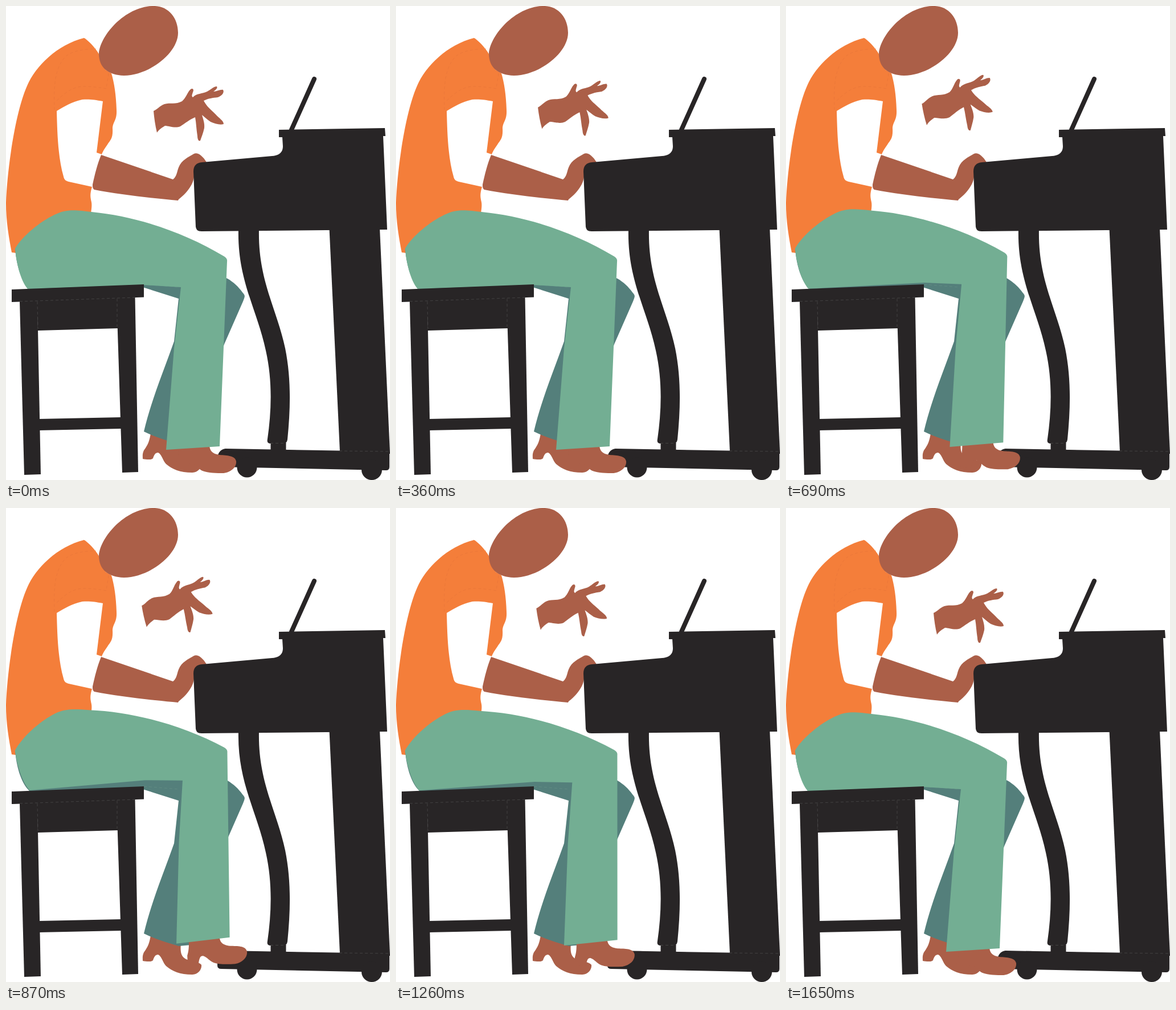
An HTML page that plays this animation: 674x831 px, repeating every 2250 ms.

```html
<!DOCTYPE html>
<html lang="en">
<head>
<meta charset="utf-8">
<title>Pianist</title>
<style>
  html, body { margin: 0; width: 100%; height: 100%; overflow: hidden; background: #fff; }
  svg { display: block; width: 674px; height: 831px; }
  .skin { fill: #ab5f48; }
  .shirt { fill: #f47e3a; }
  .near { fill: #73ae93; }
  .far { fill: #547f7b; }
  .wood { fill: #282526; }
  .seam { fill: none; stroke-width: .6; stroke-dasharray: 5 4; }
</style>
</head>
<body>
<svg viewBox="0 0 674 831">
  <!-- Torso, head and resting arm -->
  <path class="shirt" d="M137 56C144 60 156 72 163 84L175 112L185 118C190 135 193 155 194 182C195 200 188 202 187 214C188 232 184 234 178 243C173 250 170 255 168 260L159 257L170 167C155 164 145 163 134 164C115 168 103 176 89 184C90 220 91 265 101 299C102 305 106 307 110 308L151 317C147 330 148 335 150 344C151 350 150 355 149 364L18 433L10 432C5 405 0 378 0 345C2 290 15 190 37 140C52 105 90 68 137 56Z"/>
  <path class="seam" stroke="#e5733a" d="M85 182C84 150 83 110 105 88C118 78 135 76 158 75M89 166C105 150 120 141 136 141C152 141 165 143 176 145L180 118"/>
  <path class="skin" d="M258 0C284-1 302 20 302 47C302 83 250 122 207 122C179 121 163 108 163 83C166 50 210 1 258 0Z"/>
  <path class="skin" d="M167 261L293 304C300 299 300 290 303 283C308 270 320 265 330 259C336 256 345 262 352 274L330 300C328 315 315 330 303 339L302 341C260 337 200 331 155 322C152 320 152 317 152 313C156 295 160 278 167 261Z"/>

  <!-- Far leg -->
  <path class="skin" d="M254 748C252 765 247 772 242 779C239 785 240 790 240 794C250 796 256 795 258 793C260 787 262 783 267 783C273 785 275 797 281 803C292 812 305 818 327 818C338 818 344 808 343 801C338 794 322 796 313 789C306 783 306 775 307 762Z"/>
  <path class="far" d="M16 425C18 450 25 480 41 496L240 493L303 513L295 588C277 639 255 691 242 746C262 756 283 762 303 768L325 766L383 593L416 518C420 508 420 508 415 502C408 492 399 484 389 478L300 440Z"/>
  <path class="seam" stroke="#6b9488" d="M242 488L303 493"/>

  <!-- Piano -->
  <g class="wood">
    <path d="M501 217L541 128" stroke="#282526" stroke-width="8" stroke-linecap="round"/>
    <path d="M329 290C329 280 334 275 344 274L467 263C480 262 486 256 486 246L485 230H479V217L665 214L666 228H662L669 392L343 395C336 395 334 392 333 387Z"/>
    <path d="M567.500 390H656L674 785L586 781Z"/>
    <path d="M408 392H444C442 480 475 530 490 600C500 650 500 700 494 760C493 766 490 767 486 767H465C459 767 458 764 459 759C466 710 468 657 456 604C440 530 406 480 408 392Z"/>
    <path d="M464.500 766H491.500V779H464.500Z"/>
    <path d="M385 776L673 781V808Q673 814 667 814L378 808Q371 808 371 802V794C371 785 376 777 385 776Z"/>
    <circle cx="423" cy="809" r="17.500"/>
    <circle cx="642" cy="813" r="18"/>
  </g>
  <path class="seam" stroke="#555" d="M464 766.500H492M585 780L672 781"/>

  <!-- Near leg, swinging from the hip -->
  <g id="leg">
    <path class="skin" d="M303 772C303 788 301 794 299 800V813C308 816 315 816 318 815C320 805 322 801 327 802C333 804 338 812 345 815C355 819 370 819 382 819C396 817 405 808 404 798C402 788 388 788 375 787C362 785 357 780 357 768Z"/>
    <path class="near" d="M16 425C30 402 60 378 85 366C105 356 120 357 150 361C225 368 310 395 383 439Q389 443 388 448L375 772L281 778L295 600L307 493L241 489L38 496C25 480 18 450 16 425Z"/>
  </g>

  <!-- Stool -->
  <g class="wood">
    <path d="M10 497L242 488V510.500L10 519Z"/>
    <path d="M54 515L197 510V565L56 569Z"/>
    <path d="M24 517L55 515L61 821L32 822Z"/>
    <path d="M194 510L226.500 509L232 817L204 818Z"/>
    <path d="M57 724L202 721V741L57 744Z"/>
  </g>
  <path class="seam" stroke="#555" d="M24 518L227 511M55 518L56 566M195 513V562"/>

  <!-- Raised hand, swinging from the elbow -->
  <path id="hand" class="skin" d="M259 184C266 181 270 175 278 172C288 169 298 173 309 167C316 161 318 152 323 147C326 143 331 145 328 151C327 155 325 158 328 160C334 153 345 154 353 150C360 146 365 141 370 141C372 144 368 147 364 150C370 150 376 146 381 147C384 152 378 158 372 160C363 161 355 162 347 166C352 176 360 182 368 190C374 197 382 201 382 207C375 209 366 206 359 203C353 199 349 195 344 191C346 198 349 206 348 214C346 223 343 230 341 236C338 238 336 233 336 228C334 216 334 206 332 195C322 199 314 206 306 211C297 215 285 210 279 210C274 213 268 217 265 222C262 210 260 196 259 184Z"/>
</svg>
<script>
  const LOOP = 2250, STEP = 30;
  const hand = document.getElementById("hand");
  const leg = document.getElementById("leg");

  // Sine ease from 0 to 1 between two times
  function ease(time, start, end) {
    const p = Math.min(1, Math.max(0, (time - start) / (end - start)));
    return (1 - Math.cos(Math.PI * p)) / 2;
  }

  function draw(time) {
    const lift = ease(time, 0, 735) - ease(time, 968, 1655);
    const swing = ease(time, 500, 1050) - ease(time, 1050, 1520);
    hand.setAttribute("transform", `rotate(${-4 * lift} 67 475)`);
    leg.setAttribute("transform", `rotate(${-4 * swing} 20 430)`);
  }

  const origin = performance.now();
  function tick() {
    const time = (performance.now() - origin) % LOOP;
    draw(Math.floor(time / STEP) * STEP);
    requestAnimationFrame(tick);
  }
  tick();
</script>
</body>
</html>
```
